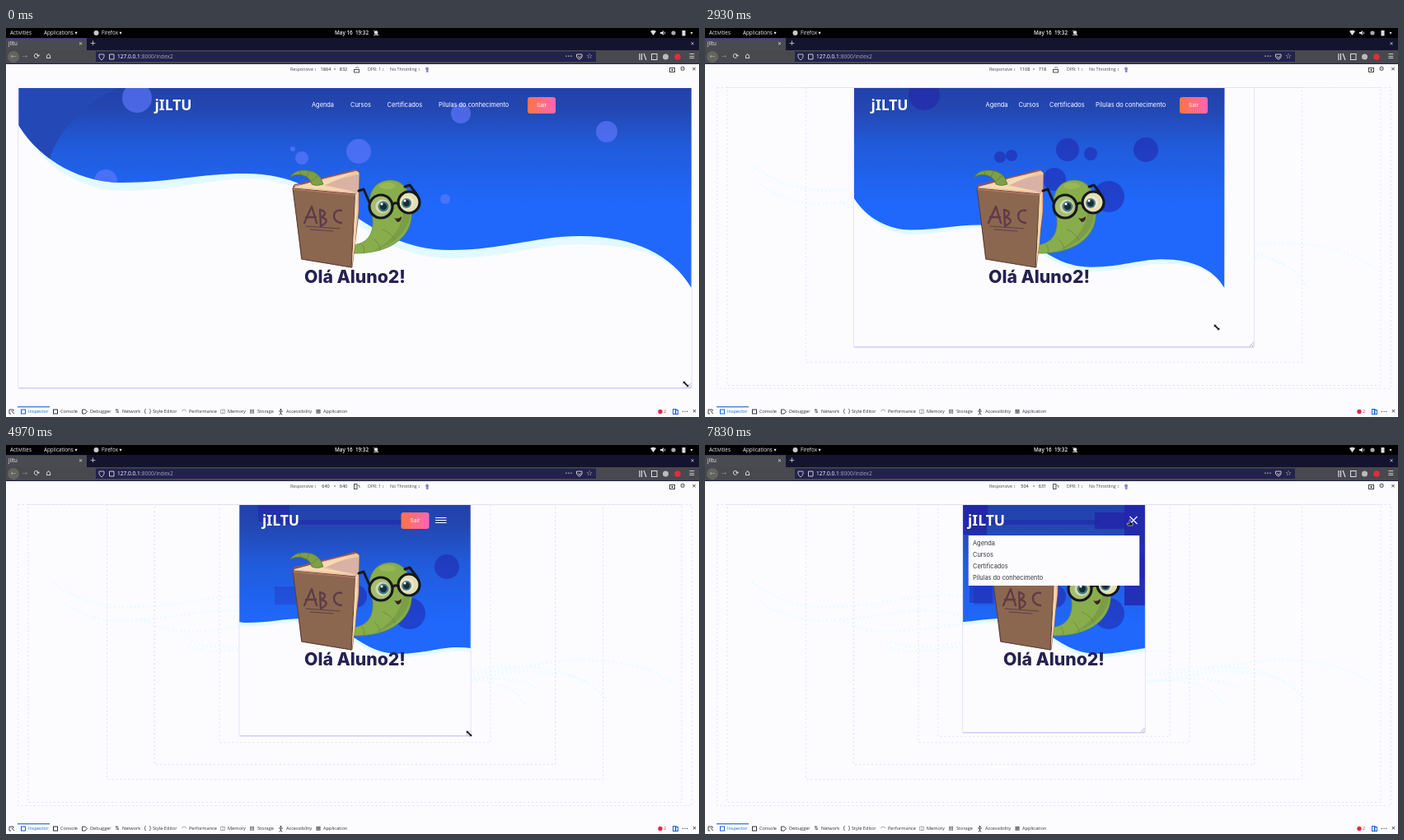
An HTML page with a canvas that plays this animation: 841 by 473 pixels, repeating every 8 s.

```html
<!DOCTYPE html>
<html lang="pt">
<head>
<meta charset="utf-8">
<title>Responsive page demo</title>
<style>
html, body { margin: 0; width: 100%; height: 100%; overflow: hidden; background: #fcfcff; }
canvas { display: block; }
</style>
</head>
<body>
<canvas id="stage" width="841" height="473"></canvas>
<script>
const ctx = document.getElementById('stage').getContext('2d');
const LOOP = 8000, SCALE = 0.438, MID = 423.5, TOP = 73;
const PAPER = '#fcfcff', INK = '#262150', SHADE = '#2223a9';
const UI = '"Open Sans", sans-serif', GLYPH = '"DejaVu Sans", sans-serif', PAGE = 'Inter, sans-serif';

// start time, viewport width and height, width the page was laid out with
const STATES = [
  { t: 0, w: 1864, h: 832, page: 1864 },
  { t: 930, w: 1808, h: 823, page: 1607 },
  { t: 1330, w: 1372, h: 759, page: 1395 },
  { t: 1970, w: 1108, h: 718, page: 1108 },
  { t: 2930, w: 1108, h: 718, page: 1026 },
  { t: 3130, w: 749, h: 657, page: 749 },
  { t: 3900, w: 640, h: 640, page: 640 },
  { t: 5870, w: 504, h: 631, page: 504 }
];

// time, x, y, cursor shape from that time on
const CURSOR = [
  [0, 825, 433, 'resize'], [30, 825, 433, 'resize'], [100, 818, 431, 'arrow'],
  [900, 818, 431, 'arrow'], [930, 750, 414, 'arrow'], [1170, 738, 411, 'arrow'],
  [1330, 738, 411, 'arrow'], [1530, 698, 399, 'arrow'], [1970, 698, 399, 'arrow'],
  [2470, 662, 384, 'resize'], [2900, 662, 384, 'resize'], [2930, 621, 364, 'resize'],
  [3470, 583, 358, 'resize'], [3900, 583, 358, 'resize'], [4030, 564, 352, 'resize'],
  [4200, 562, 351, 'resize'], [5830, 562, 351, 'resize'], [5930, 532, 347, 'resize'],
  [6200, 532, 347, 'resize'], [6600, 542, 320, 'arrow'], [6670, 542, 320, 'arrow'],
  [7270, 531, 186, 'arrow'], [7470, 531, 186, 'arrow'], [7570, 516, 95, 'hand'],
  [8000, 516, 95, 'hand']
];

const ease = k => k * k * (3 - 2 * k);
const clamp = k => Math.max(0, Math.min(1, k));

function text(str, x, y, size, color, family = UI, weight = 400, align = 'left') {
  ctx.font = `${weight} ${size}px ${family}`;
  ctx.fillStyle = color;
  ctx.textAlign = align;
  ctx.textBaseline = 'middle';
  ctx.fillText(str, x, y);
}
const icon = (ch, x, y, size, color) => text(ch, x, y, size, color, GLYPH, 400, 'center');

function rect(x, y, w, h, color) {
  ctx.fillStyle = color;
  ctx.fillRect(x, y, w, h);
}

function disc(x, y, rx, color, ry = rx) {
  ctx.beginPath();
  ctx.ellipse(x, y, rx, ry, 0, 0, 7);
  ctx.fillStyle = color;
  ctx.fill();
}

function shape(d, fill, stroke, width = 1) {
  const path = new Path2D(d);
  if (fill) { ctx.fillStyle = fill; ctx.fill(path); }
  if (stroke) { ctx.strokeStyle = stroke; ctx.lineWidth = width; ctx.stroke(path); }
}

function box(x, y, w, h, color) {
  ctx.strokeStyle = color;
  ctx.lineWidth = 1;
  ctx.strokeRect(x, y, w, h);
}

function geometry(s) {
  const fw = s.w * SCALE, left = MID - fw / 2, width = s.page * SCALE;
  const mobile = s.page < 950;
  return {
    left, fw, fh: s.h * SCALE, width, mobile, mid: left + width / 2,
    k: Math.max(width / 817, 0.46), base: mobile ? 275 : 316
  };
}

// Wave edge around the page centre, measured up from the bottom of the artwork.
function waveLine(g, drop) {
  ctx.save();
  ctx.translate(g.mid, g.base);
  ctx.scale(g.k, g.k);
  ctx.moveTo(-408.5, -198);
  ctx.bezierCurveTo(-380, -152 + drop / 2, -330, -128 + drop, -282, -128 + drop);
  ctx.bezierCurveTo(-225, -128 + drop, -190, -139 + drop, -133, -139 + drop * 0.6);
  ctx.bezierCurveTo(-20, -139 + drop * 0.6, 5, -46 + drop, 116, -46 + drop);
  ctx.bezierCurveTo(180, -46 + drop, 220, -63 + drop, 272, -63 + drop);
  ctx.bezierCurveTo(340, -63 + drop, 385, -40, 408.5, 0);
  ctx.restore();
}

function wavePath(g, drop) {
  ctx.beginPath();
  waveLine(g, drop);
  ctx.lineTo(g.mid + 409 * g.k, TOP);
  ctx.lineTo(g.mid - 408.5 * g.k, TOP);
}

function fillWave(g, drop, fill) {
  wavePath(g, drop);
  ctx.fillStyle = fill;
  ctx.fill();
}

function drawTrace(s) {
  const g = geometry(s);
  ctx.save();
  ctx.setLineDash([2, 3]);
  box(g.left - 0.5, TOP - 0.5, g.fw + 1, g.fh + 1.5, '#e2def9');
  ctx.beginPath();
  ctx.rect(g.left + 40, TOP, g.fw - 60, g.fh);
  ctx.clip();
  ctx.beginPath();
  waveLine(g, 9);
  ctx.strokeStyle = '#ecfbff';
  ctx.lineWidth = 3;
  ctx.stroke();
  ctx.restore();
}

function drawBackdrop(s, g) {
  fillWave(g, 10, '#e2faff');
  const blue = ctx.createLinearGradient(0, TOP, 0, 215);
  blue.addColorStop(0, '#2341a9');
  blue.addColorStop(0.18, '#2347b2');
  blue.addColorStop(0.5, '#215bdb');
  blue.addColorStop(1, '#1f68fb');
  fillWave(g, 0, blue);

  ctx.save();
  wavePath(g, 0);
  ctx.clip();
  if (s.page > 1500) {
    const x = g.left;
    shape(`M${x} 73H${x + 120}Q${x + 55} 105 ${x + 37} 160Q${x + 10} 150 ${x} 118Z`, '#2449b6');
    const shift = s.page < 1800 ? 6 : 0;
    for (const [bx, by, r] of [[159, 85, 18], [729, 126, 13], [552, 104, 12], [428, 150, 15],
      [359, 158, 8], [348, 147, 3], [533, 208, 6], [121, 186, 14]])
      disc(bx + shift, by - shift / 6, r, 'rgba(98,120,255,.65)');
  } else {
    ctx.globalAlpha = 0.55;
    for (const [bx, by, r] of [[266, 81, 19], [440, 148, 14], [468, 153, 8],
      [535, 148, 15], [372, 155, 7], [358, 157, 7]])
      if (!g.mobile || bx > 500) disc(bx, by, r, SHADE);
    if (s.page < 1300) {
      disc(490, 205, 19, SHADE);
      disc(424, 184, 14, SHADE);
    }
    if (g.mobile) {
      rect(306, 73, 38, 20, SHADE);
      rect(330, 91, 150, 6, SHADE);
      rect(326, 172, 26, 22, 'rgba(34,35,169,.5)');
    }
    if (s.page < 600) {
      ctx.globalAlpha = 0.8;
      rect(313, 73, 29, 36, SHADE);
      rect(473, 82, 40, 20, SHADE);
      rect(509, 73, 25, 122, SHADE);
      rect(321, 142, 28, 50, 'rgba(34,35,169,.6)');
    }
  }
  ctx.restore();
}

// Drawn at its desktop place, with the page centre at MID.
function drawMascot() {
  ctx.lineCap = ctx.lineJoin = 'round';
  // body and head
  shape('M420 264C446 262 448 240 443 221C437 200 449 185 467 185C487 186 494 207 492 230C490 254 467 275 420 274Z', '#88ad4c', '#6b8b40', 0.8);
  shape('M484 193Q494 212 489 235Q480 260 446 271Q478 254 482 225Z', '#7a9e45');
  shape('M432 263Q436 268 434 274M447 257Q454 263 454 270M457 245Q468 249 472 258', null, '#688740', 0.8);
  disc(463, 192, 10, 'rgba(180,204,100,.35)', 4);
  // book
  shape('M349 193L424 172L429 176L428 225L420 291L359 281Z', '#efc8a0', '#7a4c45', 0.8);
  shape('M381 189L428 178V225L424 200Z', '#d9b2a5');
  shape('M350 193L421 176L385 192L424 199Z', '#f8d9b2');
  shape('M349 194Q349 190 354 190L425 173', null, '#9b5550', 1.6);
  shape('M348 195L424 202L419 291L359 281Z', '#8b674f', '#5b3e3b', 1.1);
  shape('M349 196L424 203', null, '#b27765', 1.6);
  shape('M424 203L427 199L424 260L420 289Z', '#f6d5aa');
  // tail
  shape('M345 181Q350 172 364 173Q381 174 385 190Q377 193 371 190Q370 182 360 179Q352 177 345 181Z', '#7d9f46', '#5d7a31', 0.8);
  shape('M356 173L358 178M368 174L365 181M379 179L371 186', null, '#5d7a31', 0.7);
  // cover lettering
  shape('M362 237L371 217L377 237M364 230L376 230M381 221L382 241M381 221Q392 224 383 230Q395 234 382 241M407 222C396 219 394 236 407 237', null, '#5e3b48', 2.4);
  shape('M364 241L405 244M369 245L397 247', null, '#5e3b48', 1);
  // glasses and face
  disc(455, 217, 13, '#a6bd72');
  disc(489, 212, 12, '#e2dfb5');
  disc(457, 217, 8.5, '#d3dab0');
  disc(487, 212, 8, '#ece8c8');
  disc(458, 217, 6.5, '#477b86');
  disc(486, 213, 6, '#477b86');
  disc(458, 217, 4.2, '#182c36');
  disc(486, 213, 3.9, '#182c36');
  disc(456, 214, 1.5, '#fff');
  disc(484, 210, 1.5, '#fff');
  for (const [x, y, r] of [[455, 217, 14], [489, 212, 13]]) {
    ctx.beginPath();
    ctx.arc(x, y, r, 0, 7);
    ctx.strokeStyle = '#17181d';
    ctx.lineWidth = 3.2;
    ctx.stroke();
  }
  shape('M469 215Q472 211 476 214M441 212L434 196L428 198M499 203L490 191L484 193', null, '#17181d', 3);
  shape('M471 231Q476 233 480 229Q480 236 475 236Z', '#3c2227');
}

function drawButton(x, y) {
  const g = ctx.createLinearGradient(x, 0, x + 34, 0);
  g.addColorStop(0, '#ff7347');
  g.addColorStop(1, '#ff66b5');
  ctx.beginPath();
  ctx.roundRect(x, y, 34, 20, 3);
  ctx.fillStyle = g;
  ctx.fill();
  text('Sair', x + 17, y + 10.5, 6.5, '#fff', PAGE, 400, 'center');
}

function drawNav(s, g, open) {
  const links = ['Agenda', 'Cursos', 'Certificados', 'Pílulas do conhecimento'];
  if (!g.mobile) {
    const wide = s.page > 1200, half = wide ? 243 : 204;
    const xs = wide ? [-52.5, -5.5, 39, 101.5] : [-65, -25, 12.5, 68.5];
    text('jILTU', g.mid - half, 95, 17.5, '#fff', '"Noto Sans", sans-serif', 800);
    links.forEach((l, i) => text(l, g.mid + xs[i], 94, 7.4, '#fff', PAGE));
    drawButton(g.mid + half - 33.5, 84);
    return;
  }
  const small = s.page < 600, half = small ? 104.5 : 112.5;
  text('jILTU', g.mid - half, 93, 17.5, '#fff', '"Noto Sans", sans-serif', 800);
  if (!small) drawButton(g.mid + 56, 82);
  const x = g.mid + (small ? 90 : 97.5);
  shape(open > 0 ? `M${x + 2} 87l9 9m0 -9l-9 9` : `M${x} 88.5h13.5m-13.5 3h13.5m-13.5 3h13.5`, null, '#fff', 1.1);
  if (open > 0) {
    ctx.save();
    ctx.beginPath();
    ctx.rect(319.5, 110, 208, 61 * open);
    ctx.clip();
    rect(319.5, 110, 208, 61, PAPER);
    links.forEach((l, i) => text(l, 325, 119.5 + 14 * i, 7.4, '#35353c', PAGE));
    ctx.restore();
  }
}

function drawPage(t, index) {
  const s = STATES[index], g = geometry(s);
  STATES.slice(0, index).filter(p => p.w !== s.w).forEach(drawTrace);
  rect(g.left, TOP, g.fw, g.fh, PAPER);
  ctx.save();
  ctx.beginPath();
  ctx.rect(Math.round(g.left), TOP, Math.ceil(Math.min(g.width, g.fw)), g.fh);
  ctx.clip();
  drawBackdrop(s, g);
  const lift = g.mobile ? -42 : 0;
  ctx.save();
  ctx.translate(g.mid - MID, lift);
  drawMascot();
  ctx.restore();
  text('Olá Aluno2!', g.mid, 304 + lift, 21.2, INK, PAGE, 800, 'center');
  drawNav(s, g, ease(clamp((t - 7580) / 240)));
  ctx.restore();

  const right = g.left + g.fw, bottom = TOP + g.fh + 0.5;
  shape(`M${g.left} ${bottom}H${right}`, null, '#b9b2ef', 1);
  shape(`M${g.left - 0.5} ${TOP}V${bottom}M${right + 0.5} ${TOP}V${bottom}`, null, '#e4e1fb', 1);
  shape(`M${right - 5} ${bottom - 1}l5 -5m-2 5l2 -2`, null, '#9a98a8', 0.8);
}

function drawChrome(s) {
  rect(0, 0, 841, 12, '#000');
  text('Activities', 5, 6, 6.3, '#eee');
  text('Applications ▾', 46, 6, 6.3, '#eee');
  disc(109.5, 6, 3, '#c9c9d0');
  text('Firefox ▾', 116, 6, 6.3, '#eee');
  text('May 16  19:32', 399, 6, 6.3, '#eee', UI, 600);
  disc(449, 5.5, 2.3, '#ddd');
  shape('M446 8.5H452M446 3L452 9', null, '#ddd', 0.8);
  shape('M782 4Q785.5 1.5 789 4L785.5 9Z', '#ddd');
  shape('M794 5H796L798 3V9L796 7H794ZM799 4Q801 6 799 8', '#ddd');
  disc(810, 6, 2.6, '#aaa');
  rect(820.5, 3, 4, 6.5, '#ddd');
  icon('▾', 832, 6, 6, '#ddd');

  rect(0, 12, 841, 15, '#14142f');
  rect(0, 12.5, 98, 14.5, '#4a4a51');
  rect(0, 12, 98, 1, '#33339a');
  text('jIltu', 3, 19.5, 6.2, '#eee');
  icon('✕', 90.5, 19.5, 6, '#ddd');
  icon('+', 105.5, 19, 9, '#ddd');
  icon('✕', 833, 19.5, 6, '#ddd');

  rect(0, 27, 841, 16, '#48484f');
  rect(109, 28.5, 607, 12.5, '#23224d');
  disc(9, 35, 7, '#64645f');
  icon('←', 9, 34.5, 8, '#aaa');
  icon('→', 23, 34.5, 8, '#85858b');
  icon('⟳', 37.5, 34.5, 9, '#eee');
  icon('⌂', 51.5, 34.5, 10, '#eee');
  shape('M113 32H119V35Q118 38 116 39Q114 38 113 35Z', null, '#ccc', 0.9);
  shape('M125.5 32H131V38H125.5Z', null, '#ddd', 0.9);
  text('127.0.0.1', 135, 35, 6.6, '#fff');
  const hostWidth = ctx.measureText('127.0.0.1').width;
  text(':8000/index2', 135 + hostWidth, 35, 6.6, '#a6a6b8');
  icon('•••', 683, 35, 5, '#ddd');
  shape('M692.5 32H699V35Q696 41 692.5 35ZM694 34.5L696 36L698 34.5', null, '#ddd', 0.9);
  icon('☆', 708, 34.5, 9, '#ddd');
  shape('M769 31V39M771.5 31V39M774 31L777 39', null, '#ddd', 1.2);
  box(783.5, 31.5, 6.5, 7, '#ddd');
  disc(800.5, 35, 3.5, '#bbb');
  disc(815, 35, 3.8, '#e52b3c');
  icon('☰', 832, 35, 8, '#eee');

  rect(0, 43, 841, 1, '#22224d');
  rect(0, 44, 841, 14, PAPER);
  text('Responsive ↕', 345, 50.5, 5.3, '#45454d');
  text(s.w, 388, 50.5, 5.5, '#222', UI, 400, 'center');
  text('×', 399, 50.5, 5.3, '#555', UI, 400, 'center');
  text(s.h, 409.5, 50.5, 5.5, '#222', UI, 400, 'center');
  if (s.w > s.h) {
    box(422.5, 50.5, 6, 3.5, '#555');
    shape('M424 48.5Q427 46.5 428 49', null, '#555', 0.8);
  } else {
    box(422.5, 47.5, 3.5, 6, '#555');
    shape('M427 49Q430 49 429 52', null, '#555', 0.8);
  }
  text('DPR: 1 ↕', 439, 50.5, 5.3, '#45454d');
  text('No Throttling ↕', 466, 50.5, 5.3, '#45454d');
  disc(511, 49.5, 2, '#8b88c9');
  rect(510, 50, 2.5, 4, '#8b88c9');
  box(805.5, 48.5, 6, 5, '#444');
  disc(808.5, 51, 1.2, '#444');
  icon('⚙', 821, 50.5, 7.5, '#333');
  icon('✕', 835, 50.5, 6.5, '#333');
}

function drawTools() {
  rect(0, 459, 841, 14, PAPER);
  rect(14, 460, 39, 1.3, '#3a7bd0');
  shape('M4 464H9V466M4 464V469H6M6.5 465.5L10 469', null, '#333', 0.9);
  const tabs = [[21, 27, 'Inspector'], [60, 66, 'Console'], [95.5, 102, 'Debugger'],
    [135, 141, 'Network'], [172, 178, 'Style Editor'], [216, 222, 'Performance'],
    [263, 269, 'Memory'], [298.5, 305, 'Storage'], [333.5, 340, 'Accessibility'], [379, 385, 'Application']];
  const glyphs = ['', '', '', '⇅', '{ }', '◠', '◫', '▤', '', '▦'];
  tabs.forEach(([ix, tx, label], i) => {
    const color = i ? '#303038' : '#1667cf';
    if (i < 2) box(ix - 2.5, 464, 5, 5, color);
    else if (i === 2) shape('M92.5 464H96L98.5 466.5L96 469H92.5Z', null, color, 0.9);
    else if (i === 8) {
      disc(ix, 464, 1, color);
      shape('M331 466H336M333.5 466V468L332 470.5M333.5 468L335 470.5', null, color, 0.9);
    } else icon(glyphs[i], ix, 466.5, 6.5, color);
    text(label, tx, 466.7, 5.6, color);
  });
  disc(794, 466.5, 2.7, '#e0284c');
  text('2', 798, 466.7, 5.5, '#e0284c');
  box(809.5, 463.5, 3.5, 6, '#1667cf');
  box(812.5, 464.5, 3, 5, '#1667cf');
  icon('•••', 824, 466.5, 4.5, '#333');
  icon('✕', 835.5, 466.5, 6.5, '#333');
}

function drawCursor(t) {
  let i = CURSOR.length - 2;
  while (CURSOR[i][0] > t) i--;
  const [t0, x0, y0, kind] = CURSOR[i], [t1, x1, y1] = CURSOR[i + 1];
  const k = ease((t - t0) / (t1 - t0));
  ctx.save();
  ctx.translate(x0 + (x1 - x0) * k, y0 + (y1 - y0) * k);
  if (kind === 'resize') {
    shape('M-3.5 -3.5H0L-1 -2.5L2.5 1L3.5 0V3.5H0L1 2.5L-2.5 -1L-3.5 0Z', '#111', '#fff', 0.5);
  } else if (kind === 'arrow') {
    shape('M0 -4V4L1.6 2.5L2.8 5L4 4.4L2.8 2H5Z', '#111', '#fff', 0.4);
  } else {
    shape('M-1 -4Q0 -5 .7 -4V-1L3 -.5V3H-3L-4 0L-1 1Z', '#111', '#fff', 0.5);
  }
  ctx.restore();
}

function draw(t) {
  let index = STATES.length - 1;
  while (STATES[index].t > t) index--;
  rect(0, 0, 841, 473, PAPER);
  drawPage(t, index);
  drawChrome(STATES[index]);
  drawTools();
  drawCursor(t);
}

const start = performance.now();
function tick() {
  draw((performance.now() - start) % LOOP);
  requestAnimationFrame(tick);
}
tick();
</script>
</body>
</html>
```
